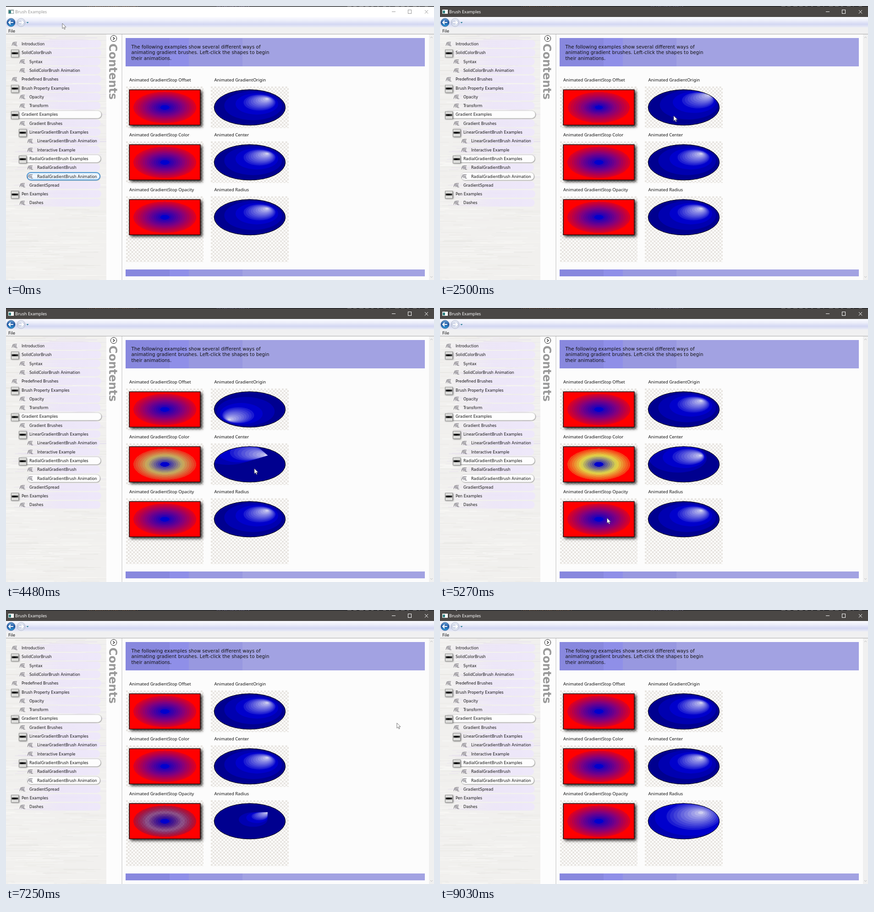
An HTML page with a canvas for the animation above (9.23 s loop, 934x599 px).

```html
<!DOCTYPE html>
<html lang="en">
<head>
<meta charset="utf-8">
<title>Brush Examples</title>
<style>
html, body { margin: 0; width: 100%; height: 100%; overflow: hidden; background: #fcfcfc; }
canvas { display: block; width: 934px; height: 599px; }
</style>
</head>
<body>
<canvas id="stage" width="934" height="599"></canvas>
<script>
const W = 934, H = 599, LOOP = 9230, STEP = 198, FIRST = 120;
const UI = '"Noto Sans", sans-serif', WIDE = '"DejaVu Sans", sans-serif';
const BOX_W = 155.5, BOX_H = 78, RECT_X = 268.8, OVAL_X = 454.2, ROWS = [182.8, 302.8, 422.8];
const ACTIVATED = 1200;
const stage = document.getElementById('stage').getContext('2d');

const lerp = (a, b, u) => a + (b - a) * u;
const mix = (a, b, u) => a.map((v, i) => lerp(v, b[i], u));
const css = ([r, g, b, a = 1]) => `rgba(${Math.round(r)},${Math.round(g)},${Math.round(b)},${a})`;

function fill(c, color, x, y, w, h) {
  c.fillStyle = color;
  c.fillRect(x, y, w, h);
}

function text(c, str, x, y, size, family, color = '#111', weight = 'normal') {
  c.font = `${weight} ${size}px ${family}`;
  c.fillStyle = color;
  c.fillText(str, x, y);
}

function line(c, color, width, ...pts) {
  c.strokeStyle = color;
  c.lineWidth = width;
  c.beginPath();
  for (let i = 0; i < pts.length; i += 2) c.lineTo(pts[i], pts[i + 1]);
  c.stroke();
}

function disc(c, x, y, r, paint, edge) {
  c.beginPath();
  c.arc(x, y, r, 0, 7);
  c.fillStyle = paint;
  c.fill();
  c.strokeStyle = edge;
  c.lineWidth = 1;
  c.stroke();
}

function ramp(c, x0, y0, x1, y1, ...colors) {
  const g = c.createLinearGradient(x0, y0, x1, y1);
  colors.forEach((color, i) => g.addColorStop(i / (colors.length - 1), color));
  return g;
}

function seeded(seed) {
  return () => (seed = (seed * 16807) % 2147483647) / 2147483647;
}

function checker(c, x, y, w, h, ox = x, oy = y) {
  const cell = 3.875;
  c.save();
  c.beginPath();
  c.rect(x, y, w, h);
  c.clip();
  fill(c, '#fdfdfc', x, y, w, h);
  c.fillStyle = '#e7e4e0';
  for (let j = 0; oy + j * cell < y + h; j++)
    for (let i = j % 2; ox + i * cell < x + w; i += 2)
      c.fillRect(ox + i * cell, oy + j * cell, cell, cell);
  c.restore();
}

// ---- window chrome -------------------------------------------------

function drawTitle(c, active) {
  const ink = active ? '#fff' : '#999';
  fill(c, active ? '#4a4745' : '#fff', 0, 0, W, 24);
  fill(c, '#25272b', 0, 0, W, 1.5);
  const rnd = seeded(11);
  for (let x = 178; x < 290; x += 4) fill(c, '#7d5a3c', x, 0, 1 + rnd() * 2, 1);
  for (let x = 460; x < 530; x += 4) fill(c, '#64617f', x, 0, 1 + rnd() * 2, 1);
  for (let x = 745; x < 915; x += 13) fill(c, '#777', x, 0, 2 + rnd() * 7, 1);
  fill(c, active ? '#fff' : '#899', 5, 8, 12, 9);
  fill(c, '#2f8080', 6, 10, 5, 6);
  fill(c, '#fff', 11, 10, 5, 6);
  text(c, 'Brush Examples', 20, 16.3, 9.2, UI, ink);
  line(c, ink, 1, 842, 12.5, 850, 12.5);
  c.strokeRect(877.5, 8.5, 7, 8);
  line(c, ink, 1, 914, 9, 921, 16.5);
  line(c, ink, 1, 921, 9, 914, 16.5);
}

function drawArrow(c, x, dir, color) {
  line(c, color, 2.2, x - 5 * dir, 36, x + 5 * dir, 36);
  line(c, color, 2.2, x + dir, 32, x + 5 * dir, 36, x + dir, 40);
}

function drawToolbar(c) {
  fill(c, ramp(c, 0, 24, 0, 48, '#fbfbff', '#eceefa', '#d3d7f2', '#eff0f6'), 0, 24, W, 24);
  fill(c, '#f0f0f1', 0, 47, W, 14);
  fill(c, '#aaa', 0, 61, W, 1);
  disc(c, 11, 36, 9, ramp(c, 0, 27, 0, 45, '#72a9dc', '#174f9d', '#38a4e0'), '#345a8c');
  drawArrow(c, 11, -1, '#fff');
  disc(c, 33, 36, 9, ramp(c, 0, 27, 0, 45, '#edf1f9', '#c6cde2', '#e5eaf5'), '#b5bbcd');
  drawArrow(c, 33, 1, '#fff');
  c.fillStyle = '#2c8298';
  c.beginPath();
  c.moveTo(44.5, 35);
  c.lineTo(49.5, 35);
  c.lineTo(47, 38);
  c.fill();
  text(c, 'File', 5, 58, 9.4, UI);
}

// ---- navigation tree -----------------------------------------------

// Each entry: indent, kind (f = folder, o = open folder, l = leaf, s = selected), label
const tree = [
  '0lIntroduction', '0fSolidColorBrush', '1lSyntax', '1lSolidColorBrush Animation',
  '0lPredefined Brushes', '0fBrush Property Examples', '1lOpacity', '1lTransform',
  '0oGradient Examples', '1lGradient Brushes', '1fLinearGradientBrush Examples',
  '2lLinearGradientBrush Animation', '2lInteractive Example',
  '1oRadialGradientBrush Examples', '2lRadialGradientBrush',
  '2sRadialGradientBrush Animation', '1lGradientSpread', '0fPen Examples', '1lDashes'
];

function drawSidebar(c) {
  fill(c, '#f1f0ee', 0, 62, 219, H - 62);
  const rnd = seeded(77);
  c.save();
  c.beginPath();
  c.rect(0, 62, 219, H - 62);
  c.clip();
  for (let i = 0; i < 620; i++) {
    const y = 62 + rnd() * 537, x = rnd() * 230 - 50, len = 15 + rnd() * 85;
    const lilac = y < 440 && x > 10 && rnd() < 0.5;
    c.globalAlpha = 0.2 + rnd() * 0.4;
    fill(c, lilac ? '#e3dcec' : rnd() < 0.5 ? '#fbfbf9' : '#e4e3df', x, y, len, 0.6 + rnd() * 1.5);
  }
  c.restore();
}

function drawFolder(c, x, y) {
  c.save();
  c.shadowColor = 'rgba(0,0,0,.55)';
  c.shadowBlur = 3;
  c.shadowOffsetX = c.shadowOffsetY = 1;
  fill(c, ramp(c, 0, y - 8, 0, y + 8, '#f2f2f0', '#c5c5c3', '#e5e5e3'), x, y - 7, 17, 17);
  c.restore();
  c.strokeStyle = '#8e8e8c';
  c.lineWidth = 1;
  c.strokeRect(x + 0.5, y - 6.5, 16, 16);
  fill(c, ramp(c, x, 0, x + 14, 0, '#444', '#000', '#333'), x + 1.5, y - 1, 14, 4);
}

function drawLeaf(c, x, y) {
  const ink = '#5a5661';
  line(c, ink, 0.8, x, y + 4, x + 2, y - 3, x + 4, y - 4, x + 4, y + 4);
  line(c, ink, 0.7, x + 1, y + 1, x + 4, y - 1);
  line(c, ink, 0.8, x + 5, y - 4, x + 11, y - 4);
  line(c, ink, 0.8, x + 6, y - 4, x + 6, y + 3, x + 9, y + 3, x + 9, y - 3);
  line(c, ink, 0.8, x + 6, y, x + 9, y);
  line(c, ink, 0.8, x + 8, y + 4, x + 12, y + 4);
}

function drawTree(c, active) {
  tree.forEach((entry, i) => {
    const level = +entry[0], kind = entry[1];
    const x = 34 + level * 17, y = 83 + i * 19.3;
    const right = 208 - level * 1.5, left = x - 22;
    const raised = kind === 'o' || kind === 's';
    c.save();
    c.beginPath();
    c.roundRect(left, y - 8.5, right - left, 16.5, 8);
    if (raised) {
      c.shadowColor = 'rgba(0,0,0,.5)';
      c.shadowBlur = 2;
      c.shadowOffsetX = c.shadowOffsetY = 0.8;
      c.fillStyle = '#fdfdfd';
    } else {
      c.fillStyle = ramp(c, left, 0, right, 0, 'rgba(238,230,250,0)', 'rgba(236,229,249,.85)', '#eee8fa');
    }
    c.fill();
    c.restore();
    if (kind === 's' && !active) {
      c.fillStyle = ramp(c, 0, y - 8, 0, y + 8, '#d9ecfb', '#f8fbff', '#cde5f8');
      c.fill();
      c.lineWidth = 2;
      c.strokeStyle = '#4d96d2';
      c.stroke();
    } else if (raised) {
      c.lineWidth = 0.7;
      c.strokeStyle = '#d0d0d0';
      c.stroke();
    }
    if (kind === 'f' || kind === 'o') drawFolder(c, x - 23, y);
    else drawLeaf(c, x - 21, y);
    text(c, entry.slice(2), x, y + 3, 8.3, WIDE);
  });
}

function drawDivider(c) {
  fill(c, '#fdfdfd', 219, 62, 34, H - 62);
  fill(c, '#bdbdbd', 252.5, 62, 1, H - 62);
  disc(c, 235, 71, 6.7, '#fff', '#222');
  line(c, '#222', 1.4, 233.5, 68, 236.7, 71, 233.5, 74);
  c.save();
  c.translate(225, 82);
  c.rotate(Math.PI / 2);
  text(c, 'Contents', 0, 0, 24.2, WIDE, '#999', 'bold');
  c.restore();
}

// ---- example page --------------------------------------------------

function drawBanner(c, y, h) {
  [[261, '#8888de'], [357, '#8f8fe8'], [399, '#9898e0'], [516, '#a2a2e2']]
    .forEach(([x, color]) => fill(c, color, x, y, 914 - x, h));
}

function drawPage(c) {
  drawBanner(c, 70, 62);
  drawBanner(c, 576, 15);
  ['The following examples show several different ways of',
    'animating gradient brushes. Left-click the shapes to begin',
    'their animations.'].forEach((s, i) => text(c, s, 273.5, 92.7 + i * 12.6, 10.3, WIDE));
  const labels = [['GradientStop Offset', 'GradientOrigin'],
    ['GradientStop Color', 'Center'], ['GradientStop Opacity', 'Radius']];
  ROWS.forEach((y, i) => {
    const h = i === 2 ? 144 : 91;
    text(c, 'Animated ' + labels[i][0], 269, y - 18, 9.5, UI);
    text(c, 'Animated ' + labels[i][1], 454.5, y - 18, 9.5, UI);
    checker(c, 262, y - 7, 169, h);
    checker(c, 447, y - 7, 170, h);
    c.save();
    c.shadowColor = 'rgba(0,0,0,.85)';
    c.shadowBlur = 6;
    c.shadowOffsetX = c.shadowOffsetY = 3.5;
    fill(c, '#000', RECT_X, y, BOX_W, BOX_H);
    c.restore();
    checker(c, RECT_X, y, BOX_W, BOX_H, 262, y - 7);
  });
  fill(c, '#f0f0f0', 923, 62, 11, H - 62);
  line(c, '#bbb', 1, 926, 70, 928.5, 67.5, 931, 70);
  line(c, '#bbb', 1, 926, 591, 928.5, 593.5, 931, 591);
}

function makeBackdrop(active) {
  const canvas = document.createElement('canvas');
  canvas.width = W;
  canvas.height = H;
  const c = canvas.getContext('2d');
  fill(c, '#fcfcfc', 0, 0, W, H);
  drawTitle(c, active);
  drawToolbar(c);
  drawSidebar(c);
  drawTree(c, active);
  drawDivider(c);
  drawPage(c);
  return canvas;
}

// ---- animated brushes ----------------------------------------------

const BLUE = [0, 0, 205, 1], RED = [255, 0, 0, 1], PURPLE = [128, 0, 128, 1];
const NAVY = [0, 0, 143];

// Progress of a three second run, or null when it is not running.
function run(t, start) {
  const u = (t - start) / 3000;
  return u >= 0 && u < 1 ? u : null;
}

function addBands(g, edges, colorAt) {
  const last = edges.length - 2;
  for (let i = 0; i <= last; i++) {
    const at = i === 0 ? 0 : i === last ? 1 : (edges[i] + edges[i + 1]) / 2;
    const color = css(colorAt(at));
    g.addColorStop(edges[i], color);
    g.addColorStop(edges[i + 1], color);
  }
}

function drawRect(c, y, offset, mid) {
  const edges = [0], n = 6;
  for (let i = 0; i <= n; i++) edges.push(offset * lerp(0.26, 1, i / n));
  for (let i = 1; i <= n; i++) edges.push(lerp(offset, 1, 0.76 * i / n));
  edges.push(1);
  const colorAt = u => u < offset ? mix(BLUE, mid, u / offset)
    : mix(mid, RED, offset < 1 ? (u - offset) / (1 - offset) : 1);
  const paint = shade => {
    const g = c.createRadialGradient(0.5, 0.5, 0, 0.5, 0.5, 0.5);
    addBands(g, edges, shade);
    fill(c, g, 0, 0, 1, 1);
  };
  c.save();
  c.translate(RECT_X, y);
  c.scale(BOX_W, BOX_H);
  if (mid[3] < 1) paint(u => [0, 0, 0, 0.9 * colorAt(u)[3]]);
  paint(colorAt);
  c.restore();
  c.strokeStyle = '#000';
  c.lineWidth = 1.2;
  c.strokeRect(RECT_X + 0.5, y + 0.5, BOX_W - 1, BOX_H - 1);
}

function glow(u) {
  if (u < 0.45) return mix([206, 206, 240], [18, 18, 208], u / 0.45);
  return u < 0.6 ? [0, 0, 204] : u < 0.81 ? [0, 0, 176] : NAVY;
}

const glowEdges = [0.81, 0.6];
for (let i = 10; i > 0; i--) glowEdges.push(0.045 * i);

// Outline of everything swept by a circle growing out of the origin:
// a disc, with a pointed cone when the origin lies outside of it.
function sweptDisc(c, [ox, oy], [cx, cy], r) {
  const dist = Math.hypot(cx - ox, cy - oy);
  const toOrigin = Math.atan2(oy - cy, ox - cx);
  const outside = dist > r;
  const gap = outside ? Math.acos(r / dist) : 0;
  c.beginPath();
  if (outside) c.moveTo(ox, oy);
  c.arc(cx, cy, r, toOrigin + gap, toOrigin - gap + 2 * Math.PI);
  c.closePath();
}

function ovalPath(c) {
  c.beginPath();
  c.arc(0.5, 0.5, 0.5, 0, 2 * Math.PI);
}

function drawOval(c, y, { origin = [0.75, 0.25], center = [0.5, 0.5], radius = 0.5 }) {
  c.save();
  c.translate(OVAL_X, y);
  c.scale(BOX_W, BOX_H);
  c.save();
  ovalPath(c);
  c.fillStyle = css(NAVY);
  c.fill();
  c.clip();
  glowEdges.forEach((edge, i) => {
    const inner = glowEdges[i + 1] ?? -edge;
    sweptDisc(c, origin, mix(origin, center, edge), radius * edge);
    c.fillStyle = css(glow((edge + inner) / 2));
    c.fill();
  });
  c.restore();
  ovalPath(c);
  c.restore();
  c.strokeStyle = '#000';
  c.lineWidth = 1;
  c.stroke();
}

// Colour animation blends in linear light.
function purpleToYellow(u) {
  return [...mix([0.216, 0, 0.216], [1, 1, 0], u).map(v => 255 * Math.pow(v, 1 / 2.2)), 1];
}

// ---- pointer -------------------------------------------------------

const pointerPath = [
  [0, 123, 38], [120, 123, 38], [1100, 345, 222], [1300, 345, 222], [2000, 517, 236],
  [2500, 510, 240], [3050, 372, 338], [3200, 372, 338], [3690, 505, 341], [4200, 542, 351],
  [4480, 542, 351], [5350, 360, 462], [5550, 360, 462], [6060, 567, 476], [6500, 567, 476],
  [7250, 853, 247], [8240, 842, 215], [9030, 31, -11]
];

function pointerAt(t) {
  const i = Math.max(1, pointerPath.findIndex(p => p[0] >= t));
  const [t0, ...from] = pointerPath[i - 1], [t1, ...to] = pointerPath[i];
  const u = (t - t0) / (t1 - t0);
  return mix(from, to, u * u * (3 - 2 * u));
}

function drawPointer(c, [x, y]) {
  c.save();
  c.translate(x, y);
  c.beginPath();
  [[0, 0], [0, 11.3], [2.6, 8.8], [4.4, 13], [6.2, 12.2], [4.4, 8.2], [8, 8.2]]
    .forEach(p => c.lineTo(...p));
  c.closePath();
  c.fillStyle = '#fff';
  c.fill();
  c.strokeStyle = '#555';
  c.lineWidth = 0.8;
  c.stroke();
  c.restore();
}

// ---- playback ------------------------------------------------------

const idle = makeBackdrop(false), focused = makeBackdrop(true);

function draw(t) {
  const c = stage;
  const offset = run(t, ACTIVATED), origin = run(t, 2090), color = run(t, 3150);
  const center = run(t, 4245), fade = run(t, 5500), radius = run(t, 6500);
  c.drawImage(t < ACTIVATED ? idle : focused, 0, 0);
  drawRect(c, ROWS[0], offset ?? 0.5, PURPLE);
  drawRect(c, ROWS[1], 0.5, color === null ? PURPLE : purpleToYellow(color));
  drawRect(c, ROWS[2], 0.5, [128, 0, 128, 1 - (fade ?? 0)]);
  drawOval(c, ROWS[0], origin === null ? {} : { origin: [1 - origin, origin] });
  drawOval(c, ROWS[1], center === null ? {} : { center: [center, center] });
  drawOval(c, ROWS[2], radius === null ? {} : { radius });
  drawPointer(c, pointerAt(t));
}

function stepTime(t) {
  return t < FIRST ? 0 : FIRST + STEP * Math.floor((t - FIRST + 4) / STEP);
}

function tick() {
  draw(Math.min(stepTime(performance.now() % LOOP), 9030));
  requestAnimationFrame(tick);
}
tick();
</script>
</body>
</html>
```
